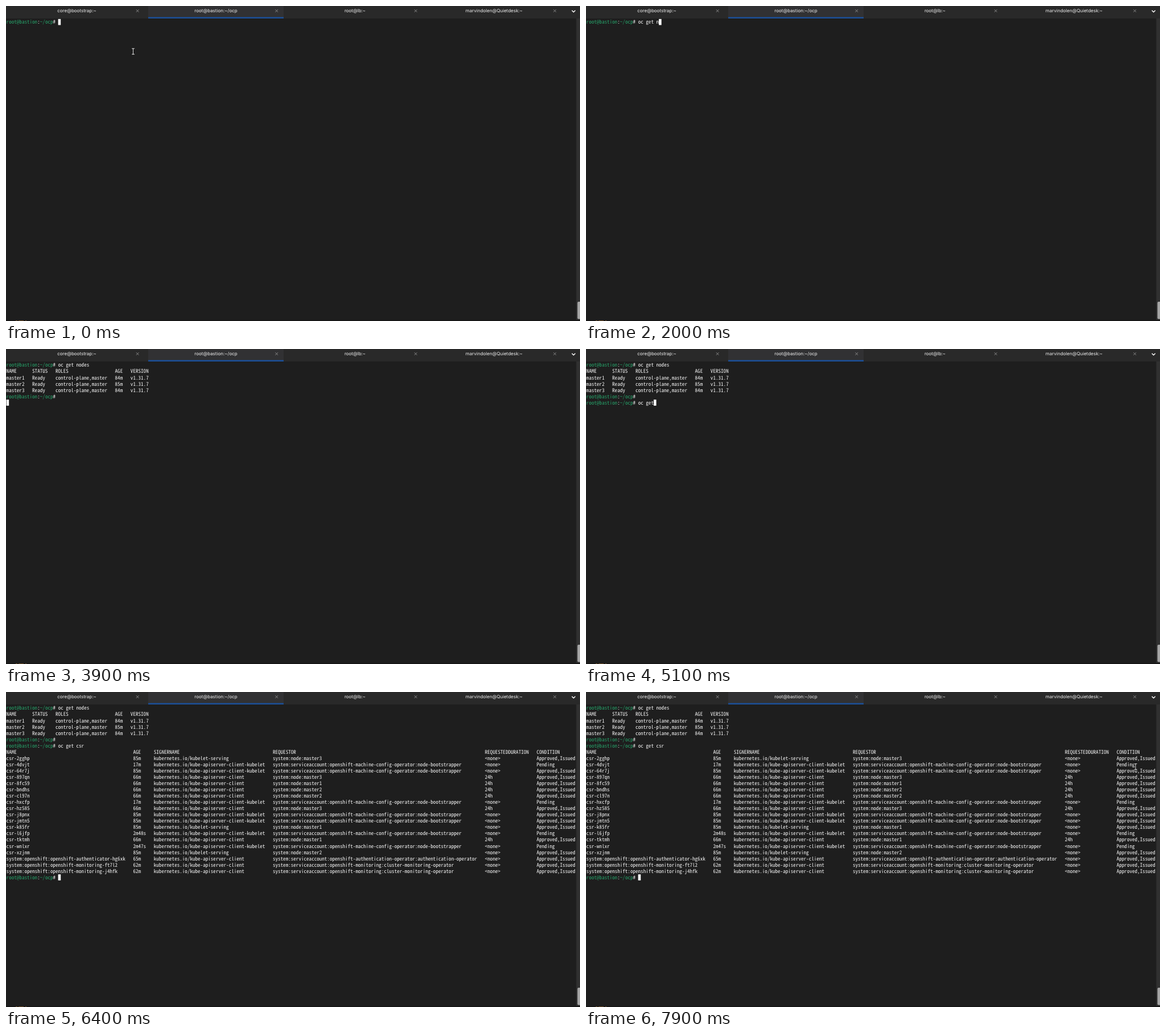
Write an HTML page with a canvas that moves like this. It is 1009 by 555 pixels and loops after 8 s.

```html
<!DOCTYPE html>
<html lang="en">
<head>
<meta charset="utf-8">
<title>Terminal</title>
<style>
html, body { margin: 0; width: 100%; height: 100%; overflow: hidden; background: #1e1e1e; }
canvas { display: block; width: 1009px; height: 555px; }
</style>
</head>
<body>
<canvas id="stage" width="1009" height="555"></canvas>
<script>
const ctx = document.getElementById('stage').getContext('2d');
const LOOP = 8000, STEP = 100;
const CELL = 4.553, LINE = 11.05, LEFT = 0.6, TOP = 22.9;
const WHITE = '#f5f5f5', GREEN = '#26a269', BACK = '#1e1e1e';
const MONO = '"Noto Sans Mono CJK JP", "Noto Sans Mono", monospace';
const UI = 'Inter, sans-serif';

ctx.textRendering = 'geometricPrecision';
ctx.font = '100px ' + MONO;
const monoFont = CELL / ctx.measureText('0').width * 100 + 'px ' + MONO;

// Pads each field to its column and joins them into one line.
const columns = (stops, fields) =>
  fields.reduce((line, field, i) => line.padEnd(stops[i]) + field, '');

const nodeStops = [0, 10, 19, 42, 48];
const nodes = [
  ['NAME', 'STATUS', 'ROLES', 'AGE', 'VERSION'],
  ...['84m', '85m', '84m'].map((age, i) =>
    ['master' + (i + 1), 'Ready', 'control-plane,master', age, 'v1.31.7'])
].map(row => columns(nodeStops, row));

const csrStops = [0, 49, 57, 103, 185, 205];
const ACCOUNT = 'system:serviceaccount:openshift-';
const signers = {
  s: 'kubelet-serving',
  c: 'kube-apiserver-client',
  k: 'kube-apiserver-client-kubelet'
};
const requestors = {
  b: ACCOUNT + 'machine-config-operator:node-bootstrapper',
  a: ACCOUNT + 'authentication-operator:authentication-operator',
  m: ACCOUNT + 'monitoring:cluster-monitoring-operator'
};
// Each entry: name, age, signer key, requestor key or master number.
const requests = `2gghp 85m s 3
4dvjt 17m k b
64r7j 85m k b
897qn 66m c 3
8fc59 66m c 1
bndhs 66m c 2
cl97n 66m c 2
hxcfp 17m k b
hz585 66m c 3
j8pnx 85m k b
jmtn5 85m k b
k85fr 85m s 1
l6jfp 2m48s k b
tktmh 66m c 1
wnlxr 2m47s k b
xzjnm 85m s 2
authenticator-hg6xk 65m c a
monitoring-ft7l2 62m c m
monitoring-j4hfk 62m c m`.split('\n').map(entry => {
  const [id, age, signer, who] = entry.split(' ');
  return columns(csrStops, [
    (id.includes('-') ? 'system:openshift:openshift-' : 'csr-') + id,
    age,
    'kubernetes.io/' + signers[signer],
    requestors[who] || 'system:node:master' + who,
    signer === 'c' && who > 0 ? '24h' : '<none>',
    /^(17m|2m)/.test(age) ? 'Pending' : 'Approved,Issued'
  ]);
});
const csrHead = columns(csrStops,
  ['NAME', 'AGE', 'SIGNERNAME', 'REQUESTOR', 'REQUESTEDDURATION', 'CONDITION']);

const first = { text: 'oc get nodes',
  keys: [600, 700, 900, 1300, 1400, 1600, 1800, 2000, 2100, 2200, 2400, 2600] };
const second = { text: 'oc get csr',
  keys: [4400, 4500, 4700, 4900, 5000, 5100, 5300, 5600, 5700, 5900] };

function text(str, col, row, color = WHITE) {
  ctx.fillStyle = color;
  ctx.fillText(str, LEFT + col * CELL, TOP + row * LINE + 8.5);
}

function prompt(row) {
  text('root@bastion', 0, row, GREEN);
  text(':', 12, row);
  text('~/ocp', 13, row, GREEN);
  text('#', 18, row);
}

function cursor(col, row) {
  ctx.fillStyle = '#fff';
  ctx.fillRect(LEFT + col * CELL, TOP + row * LINE, CELL, LINE - 0.4);
}

// Draws what has been typed and returns the column after it.
function typed(command, row, t) {
  const count = command.keys.filter(key => key <= t).length;
  text(command.text.slice(0, count), 20, row);
  return 20 + count;
}

const lines = (list, row) => list.forEach((line, i) => text(line, 0, row + i));

function terminal(t) {
  ctx.font = monoFont;
  ctx.textAlign = 'left';
  ctx.textBaseline = 'alphabetic';

  prompt(0);
  const end = typed(first, 0, t);
  if (t < 2700) return cursor(end, 0);
  if (t < 2900) return cursor(0, 1);
  lines(nodes, 1);
  if (t < 3000) return cursor(0, 5);
  prompt(5);
  if (t < 3300) return cursor(20, 5);
  if (t < 3900) return;
  if (t < 4000) return cursor(0, 6);
  prompt(6);
  const end2 = typed(second, 6, t);
  if (t < 6200) return cursor(end2, 6);
  if (t < 6300) return cursor(0, 7);
  text(csrHead, 0, 7);
  if (t < 6400) {
    text(requests[0].slice(0, 9), 0, 8);
    return cursor(33, 8);
  }
  lines(requests, 8);
  prompt(27);
  if (t < 6800 || t >= 7400) cursor(20, 27);
}

function stroke(points, color, width) {
  ctx.strokeStyle = color;
  ctx.lineWidth = width;
  ctx.beginPath();
  points.forEach(([x, y]) => ctx.lineTo(x, y));
  ctx.stroke();
}

function tabs() {
  ctx.fillStyle = '#292929';
  ctx.fillRect(0, 0, 1009, 22);
  ctx.fillStyle = '#313133';
  ctx.fillRect(250, 0, 238, 20);
  ctx.fillStyle = '#1b5099';
  ctx.fillRect(250, 19.5, 238, 2.5);

  ctx.font = '8px ' + UI;
  ctx.textAlign = 'center';
  ctx.textBaseline = 'alphabetic';
  ['core@bootstrap:~', 'root@bastion:~/ocp', 'root@lb:~', 'marvindolen@Quietdesk:~'].forEach((title, i) => {
    const x = 124.5 + i * 244.5, c = x + 106.7, y = 8.5, r = 2.3;
    ctx.fillStyle = '#f0f0f0';
    ctx.fillText(title, x, 11.2);
    stroke([[c - r, y - r], [c + r, y + r]], '#8c8c8c', 1);
    stroke([[c + r, y - r], [c - r, y + r]], '#8c8c8c', 1);
  });
  stroke([[994.7, 7.7], [997.7, 10.7], [1000.7, 7.7]], '#fff', 1.4);
}

function edges() {
  ctx.fillStyle = '#303030';
  ctx.fillRect(1002.5, 22, 6.5, 531);
  ctx.fillStyle = '#a6a6a6';
  ctx.beginPath();
  ctx.roundRect(1004.5, 521, 6, 30.5, 2);
  ctx.fill();
  ctx.fillStyle = '#151515';
  ctx.fillRect(0, 553.5, 1009, 1.5);
  ctx.fillStyle = '#70502a';
  [[17, 3], [22, 9], [34, 2]].forEach(([x, w]) => ctx.fillRect(x, 554, w, 1));
}

function beam(x, y) {
  const draw = (color, width) => {
    stroke([[x - 2.2, y - 5], [x + 2.2, y - 5]], color, width);
    stroke([[x - 2.2, y + 5], [x + 2.2, y + 5]], color, width);
    stroke([[x, y - 5], [x, y + 5]], color, width);
  };
  ctx.lineCap = 'square';
  draw('#111', 2.4);
  draw('#e8e8e8', 1);
  ctx.lineCap = 'butt';
}

function pointer(t) {
  if (t < 600) return beam(223.5, 80 + (t >= 400 ? 0.5 : 0));
  if (t < 7000) return;
  if (t >= 7900) return beam(966, 131.5);
  const u = (t - 7000) / 800, v = 1 - u, ease = u * u * (3 - 2 * u);
  beam(223.5 + 726 * ease, 80 * v * v + 2 * v * u * -7 + 137.5 * u * u);
}

function frame(now) {
  const t = Math.floor(now % LOOP / STEP) * STEP;
  ctx.fillStyle = BACK;
  ctx.fillRect(0, 0, 1009, 555);
  tabs();
  terminal(t);
  edges();
  pointer(t);
}

const start = performance.now();
function tick() {
  frame(performance.now() - start);
  requestAnimationFrame(tick);
}
tick();
</script>
</body>
</html>
```
